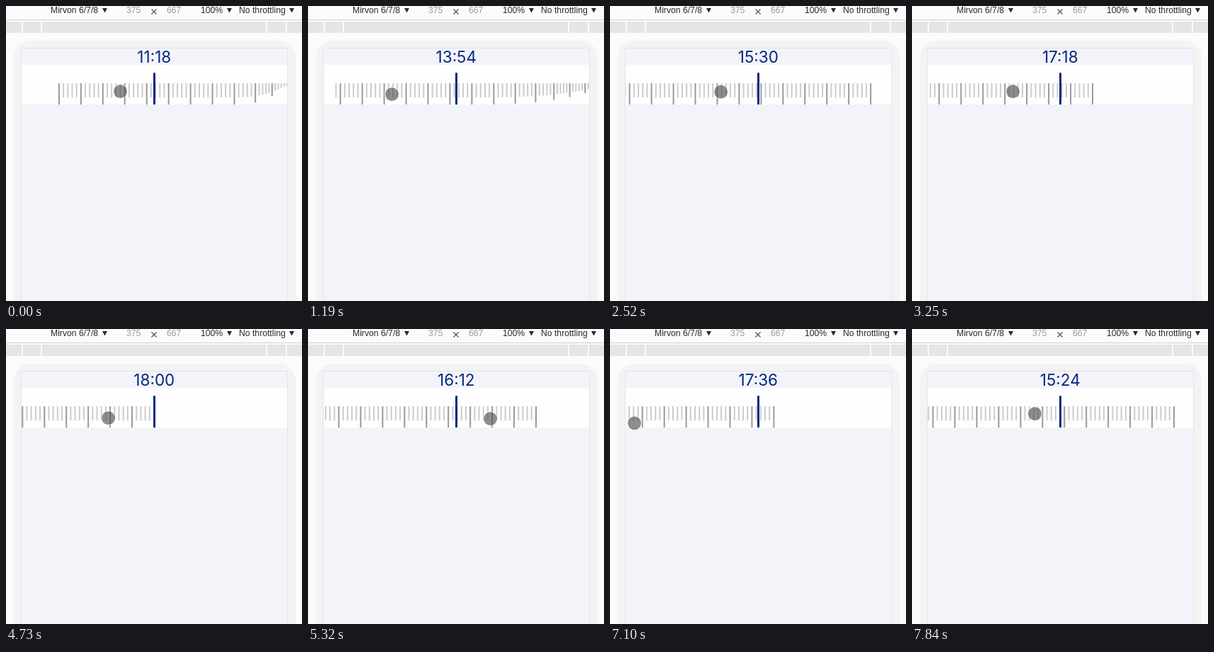
Animation, 418 px wide and 416 px high, one loop 7.99 s. Source, as an HTML page with a canvas:

```html
<!DOCTYPE html>
<html lang="en">
<head>
<meta charset="utf-8">
<title>Time ruler</title>
<style>
  html, body { margin: 0; width: 100%; height: 100%; overflow: hidden; background: #fbfbfb; }
  canvas { display: block; width: 418px; height: 416px; }
</style>
</head>
<body>
<canvas id="stage" width="418" height="416"></canvas>
<script>
const ctx = document.getElementById('stage').getContext('2d');
const LOOP = 7990, STEPS = 54;
const GAP = 6.19, TICKS = 90;
const BLUE = '#03297f';

// Where each swipe ends; units are six-minute marks before 18:00.
const POSES = [
  { step: 0, end: 632, units: 67, x: 161, y: 120 },
  { step: 8, end: 479, units: 41, x: 118, y: 124 },
  { step: 13, end: 458.6, units: 39, x: 205, y: 121 },
  { step: 22, end: 255, units: 7, x: 142, y: 120 },
  { step: 29, end: 252, units: 7, x: 187, y: 122 },
  { step: 32, end: 209, units: 0, x: 144, y: 125 },
  { step: 36, end: 322, units: 18, x: 257, y: 126 },
  { step: 40, end: 221.5, units: 0, x: 66, y: 134 },
  { step: 44, end: 209, units: 0, x: 10, y: 141 },
  { step: 49, end: 237, units: 5, x: 40, y: 130 },
  { step: 53, end: 370, units: 26, x: 173, y: 119 }
];

function poseAt(step) {
  const next = Math.max(1, POSES.findIndex(pose => pose.step >= step));
  const a = POSES[next - 1], b = POSES[next];
  const p = (step - a.step) / (b.step - a.step);
  const mix = key => a[key] + (b[key] - a[key]) * p;
  // Long forward scrolls take a stroke, a return and another stroke.
  const stroke = 0.3 * Math.min(0, b.end - a.end) * Math.sin(2 * Math.PI * p);
  return { end: mix('end'), units: mix('units'), x: mix('x') + stroke, y: mix('y') };
}

function rect(x, y, w, h, color) {
  ctx.fillStyle = color;
  ctx.fillRect(x, y, w, h);
}

function roundRect(x, y, w, h, radius, color) {
  ctx.fillStyle = color;
  ctx.beginPath();
  ctx.roundRect(x, y, w, h, radius);
  ctx.fill();
}

function label(text, x, y, color = '#2a2a2a') {
  ctx.fillStyle = color;
  ctx.fillText(text, x, y);
}

function arrow(x) {
  ctx.fillStyle = '#2a2a2a';
  ctx.beginPath();
  ctx.moveTo(x, 3);
  ctx.lineTo(x + 7, 3);
  ctx.lineTo(x + 3.5, 9.5);
  ctx.fill();
}

function drawToolbar() {
  ctx.font = '12.2px "Liberation Sans", Arial, sans-serif';
  ctx.textAlign = 'left';
  label('Mirvon 6/7/8', 63, 10);
  label('375', 170, 10, '#999');
  label('667', 227, 10, '#999');
  label('100%', 275, 10);
  label('No throttling', 329, 10);
  [136, 312, 400].forEach(arrow);
  ctx.strokeStyle = '#555';
  ctx.lineWidth = 1.3;
  ctx.beginPath();
  ctx.moveTo(205.5, 4.5); ctx.lineTo(212.5, 11.5);
  ctx.moveTo(212.5, 4.5); ctx.lineTo(205.5, 11.5);
  ctx.stroke();
  rect(0, 19, 418, 1, '#cfcfcf');
  rect(0, 22, 418, 16, '#e5e5e5');
  for (const x of [22, 49, 367, 395]) rect(x, 22, 2, 16, '#fbfbfb');
}

function drawPhone() {
  roundRect(11, 49, 398, 400, 24, '#f3f3f3');
  rect(21, 59, 377, 360, '#e4e4ea');
  rect(22, 60, 375, 360, '#f3f3f9');
  rect(22, 83, 375, 56, '#fefefe');
}

function drawRuler(end, step) {
  // Ticks past the loaded part are still growing in.
  const loaded = 40 + 0.207 * step ** 2;
  const tail = 16 + 22 * Math.sin(Math.PI * Math.min(1, step / 13));
  const left = step < 9 ? 38 : 22;
  ctx.save();
  ctx.beginPath();
  ctx.rect(left, 83, 397 - left, 56);
  ctx.clip();
  let x = end - TICKS * GAP;
  for (let i = 0; i <= TICKS; i++) {
    const grown = 1 - (Math.max(0, i - loaded) / tail) ** 2;
    if (i) x += GAP * Math.max(0.7, grown);
    const major = i % 5 === 0;
    if (grown > 0) rect(x - 1, 109, 2, (major ? 30 : 20) * grown, major ? '#999' : '#ccc');
  }
  ctx.restore();
}

function drawTouch(x, y) {
  ctx.beginPath();
  ctx.arc(x + 0.5, y + 0.5, 9.5, 0, Math.PI * 2);
  ctx.fillStyle = 'rgba(72,72,72,.62)';
  ctx.fill();
  ctx.beginPath();
  ctx.arc(x + 0.5, y + 0.5, 10.2, 0, Math.PI * 2);
  ctx.strokeStyle = 'rgba(255,255,255,.6)';
  ctx.lineWidth = 1;
  ctx.stroke();
}

function drawClock(units) {
  const minutes = 18 * 60 - Math.round(units) * 6;
  const text = Math.floor(minutes / 60) + ':' + String(minutes % 60).padStart(2, '0');
  ctx.font = '22.5px Inter, sans-serif';
  ctx.textAlign = 'center';
  label(text, 209.3, 80, BLUE);
}

function draw(now) {
  const step = Math.floor((now % LOOP) / LOOP * STEPS + 0.1) % STEPS;
  const pose = poseAt(step);
  rect(0, 0, 418, 416, '#fbfbfb');
  drawToolbar();
  drawPhone();
  drawClock(pose.units);
  drawRuler(pose.end, step);
  roundRect(208, 94, 3, 45, 1, BLUE);
  drawTouch(pose.x, pose.y);
}

const start = performance.now();
function tick() {
  draw(performance.now() - start);
  requestAnimationFrame(tick);
}
tick();
</script>
</body>
</html>
```
